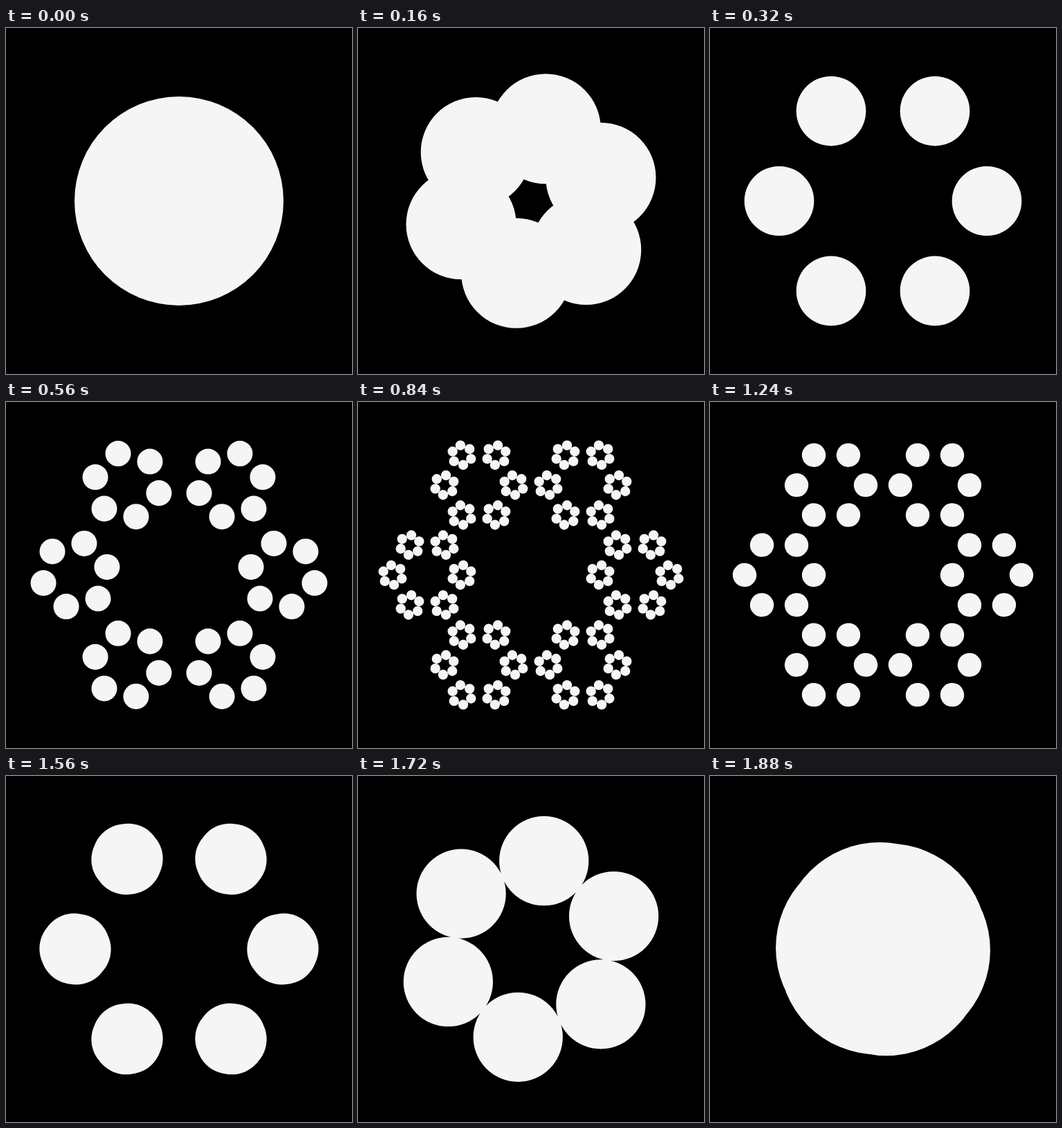
Recreate the animation shown at these times as an HTML page with a canvas. Size 500x500 px, loop 1920 ms.

```html
<!DOCTYPE html>
<html lang="en">
<head>
<meta charset="utf-8">
<title>Splitting circles</title>
<style>
  html, body { margin: 0; width: 100%; height: 100%; overflow: hidden; background: #000; }
  canvas { display: block; }
</style>
</head>
<body>
<canvas id="stage" width="500" height="500"></canvas>
<script>
const ctx = document.getElementById('stage').getContext('2d');
const LOOP = 1920, STEP = 40, STAGE = 320;
const RADIUS = 151, REACH = 150, TURN = 2 * Math.PI, SPIN = TURN * 3 / 4;

// Cosine ease that runs quicker at the start and settles late.
function ease(x) {
  const u = x * (1.55 - .55 * x);
  return (1 - Math.cos(Math.PI * u)) / 2;
}

function dot(x, y, r) {
  ctx.moveTo(x + r, y);
  ctx.arc(x, y, r, 0, TURN);
}

// Settled levels recurse; the active level is spread by p and turned.
function ring(x, y, depth, spin, move) {
  const scale = 3 ** -depth;
  const active = depth === move.level;
  const spread = REACH * scale * (active ? move.p : 1);
  const turn = active ? spin * move.dir * SPIN * (1 - move.p) : 0;
  for (let k = 0; k < 6; k++) {
    const angle = k * TURN / 6 + turn;
    const cx = x + spread * Math.cos(angle);
    const cy = y + spread * Math.sin(angle);
    if (active) dot(cx, cy, RADIUS * scale * (1 - move.p * 2 / 3));
    else ring(cx, cy, depth + 1, k % 2 ? spin : -spin, move);
  }
}

function draw(time) {
  const t = Math.floor((time % LOOP) / STEP) * STEP;
  const stage = Math.floor(t / STAGE);
  const phase = t / STAGE - stage;
  const move = stage < 3
    ? { level: stage, p: ease(phase), dir: 1 }
    : { level: 5 - stage, p: ease(1 - phase), dir: -1 };

  ctx.fillStyle = '#000';
  ctx.fillRect(0, 0, 500, 500);
  ctx.fillStyle = '#f5f5f5';
  ctx.beginPath();
  ring(250, 250, 0, -1, move);
  ctx.fill();
}

const start = performance.now();
function tick() {
  draw(performance.now() - start);
  requestAnimationFrame(tick);
}
tick();
</script>
</body>
</html>
```
